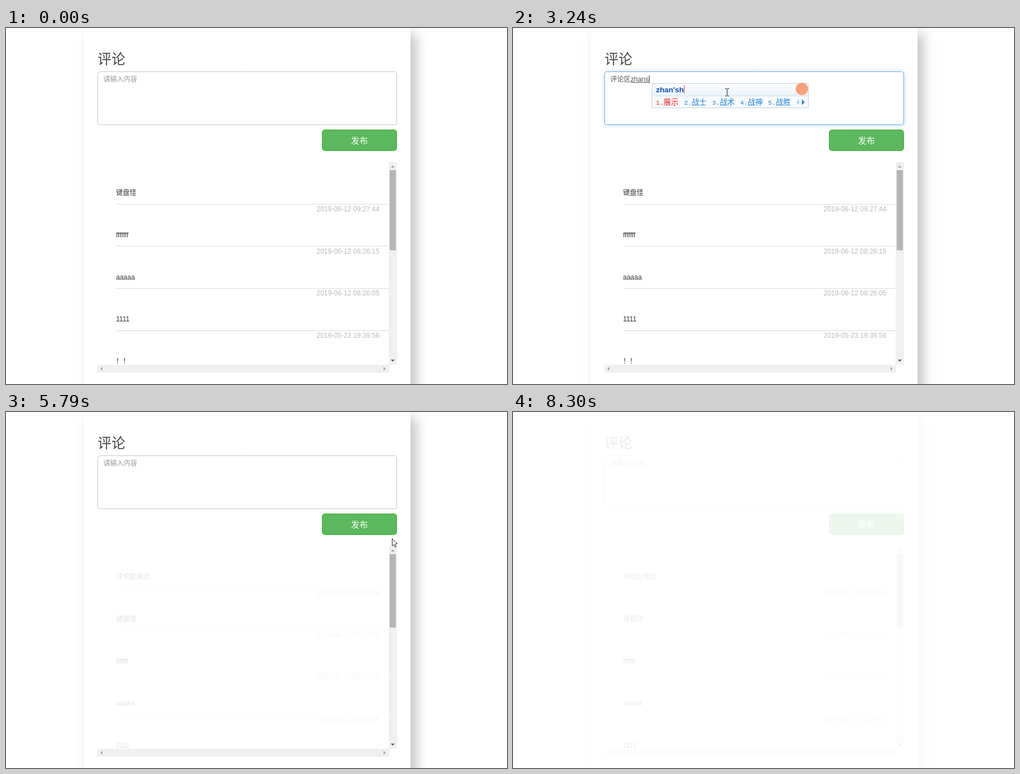
These frames come from a looping animation (888x631 px, 8.37 s). An HTML page with a canvas:

```html
<!DOCTYPE html>
<html lang="zh-CN">
<head>
<meta charset="utf-8">
<style>
html, body { margin: 0; width: 100%; height: 100%; overflow: hidden; background: #fff; }
canvas { display: block; }
</style>
</head>
<body>
<canvas id="stage" width="888" height="631"></canvas>
<script>
const ctx = document.getElementById('stage').getContext('2d');
const LOOP = 8370;
const SANS = '"Liberation Sans", "Noto Sans CJK SC", "Noto Sans CJK", sans-serif';
const MONO = '"Liberation Mono", "Noto Sans CJK SC", "Noto Sans CJK", monospace';
const ROW = 74.67;
const BOX = { x: 162.5, y: 77.5, w: 530, h: 94 };

const oldComments = [
  ['键盘怪', '2019-06-12 09:27:44'],
  ['fffffff', '2019-06-12 08:26:15'],
  ['aaaaa', '2019-06-12 08:26:05'],
  ['1111', '2019-05-23 19:39:56'],
  ['！！', '']
];
const newComments = [['评论区展示', '2019-06-12 09:29:05'], ...oldComments.slice(0, 4)];

// time, committed text, letters being typed, letters in the popup, candidates
const typing = [
  [0, '', '', '', ''],
  [1660, '', 'p', 'p', '怕 平 片 跑 批'],
  [1900, '', 'pl', "p'l", '评论 漂亮 频率 跑路 披露'],
  [2140, '', 'plu', "p'lu", '跑路 披露 平路 铺路 plu'],
  [2220, '', 'plun', "p'lun", '评论 谱论 怕 平 plun'],
  [2450, '', 'plunq', "p'lun'q", '评论区 评论 谱论 平 怕'],
  [2610, '', 'plunqu', "p'lun'qu", '评论区 评论 谱论 平 怕'],
  [2780, '评论区', '', '', ''],
  [2930, '评论区', 'z', 'z', '在 中 这 再 只'],
  [3010, '评论区', 'zh', 'zh', '中 这 只 着 找'],
  [3090, '评论区', 'zha', 'zha', '扎 炸 查 眨 渣'],
  [3160, '评论区', 'zhan', 'zhan', '站 战 占 展 沾'],
  [3240, '评论区', 'zhans', "zhan'sh", '展示 战士 战术 战神 战胜'],
  [3320, '评论区', 'zhansh', "zhan'sh", '展示 战士 战术 战神 战胜'],
  [3400, '评论区', 'zhanshi', "zhan'shi", '展示 战士 战时 暂时 站'],
  [3480, '评论区展示', '', '', ''],
  [5150, '', '', '', '']
];

// time, x, y of the pointer
const path = [
  [70, 765, 600], [790, 379, 114], [3720, 379, 114], [4440, 628, 180],
  [4600, 632, 200], [5070, 632, 200], [5790, 684, 224], [5950, 692, 250],
  [6810, 785, 330], [7430, 892, 400]
];

function text(str, x, y, color, size = 12, family = SANS, weight = '') {
  ctx.font = `${weight} ${size}px ${family}`;
  ctx.fillStyle = color;
  ctx.fillText(str, x, y);
  return ctx.measureText(str).width;
}

function rect(x, y, w, h, color) {
  ctx.fillStyle = color;
  ctx.fillRect(x, y, w, h);
}

function roundRect(x, y, w, h, r, fill, stroke) {
  ctx.beginPath();
  ctx.roundRect(x, y, w, h, r);
  ctx.fillStyle = fill;
  ctx.fill();
  if (!stroke) return;
  ctx.strokeStyle = stroke;
  ctx.lineWidth = 1;
  ctx.stroke();
}

function polygon(points, fill, stroke) {
  ctx.beginPath();
  points.forEach(([x, y]) => ctx.lineTo(x, y));
  ctx.closePath();
  ctx.fillStyle = fill;
  ctx.fill();
  if (stroke) {
    ctx.strokeStyle = stroke;
    ctx.lineWidth = 1;
    ctx.stroke();
  }
}

// small triangle whose tip points along (dx, dy)
function triangle(x, y, dx, dy, size, color) {
  const half = size / 2;
  polygon([
    [x + dx * half, y + dy * half],
    [x - dx * half + dy * size, y - dy * half + dx * size],
    [x - dx * half - dy * size, y - dy * half - dx * size]
  ], color);
}

function withShadow(color, blur, dx, dy, draw) {
  ctx.save();
  ctx.shadowColor = color;
  ctx.shadowBlur = blur;
  ctx.shadowOffsetX = dx;
  ctx.shadowOffsetY = dy;
  draw();
  ctx.restore();
}

function drawPage() {
  rect(0, 0, 888, 631, '#fff');
  withShadow('#c3c3c3', 20, 10, 10, () => rect(138, 0, 579, 700, '#fff'));
  text('评论', 162.5, 64, '#444', 24.5, SANS, 300);
  roundRect(560.5, 180.5, 132, 37, 5, '#5cb85c', '#46a546');
  text('发布', 611.5, 204.5, '#fff', 15);
}

function drawInput(t) {
  const focused = t >= 710 && t < 4200;
  const [, done, letters, pinyin, words] = typing.filter(s => t >= s[0]).pop();
  const { x, y, w, h } = BOX;
  if (focused) {
    withShadow('rgba(102,175,233,.5)', 8, 0, 0, () => roundRect(x, y, w, h, 4, '#fff'));
  }
  roundRect(x, y, w, h, 4, '#fff', focused ? '#66afe9' : '#c4c6c8');

  const left = 172.5, base = 95;
  if (!done && !letters) text('请输入内容', left, base, '#999');
  const start = left + text(done, left, base, '#555');
  const end = start + text(letters, start, base, '#555');
  if (letters) rect(start, 96, end - start, 1, '#555');
  if (focused && !(t >= 1340 && t < 1660)) rect(Math.round(end), 84, 1, 14, '#333');
  return pinyin && { pinyin, words: words.split(' '), x: popupX(start, pinyin) };
}

function popupX(start, pinyin) {
  ctx.font = '12px ' + SANS;
  return Math.round(start + ctx.measureText(pinyin.replace(/'/g, '')).width - .9);
}

function drawPopup({ pinyin, words, x }) {
  const isLatin = word => /[a-z]/.test(word);
  const widthOf = word => word.length * (isLatin(word) ? 6.67 : 13.33);
  const total = words.reduce((sum, word) => sum + 13.33 + widthOf(word) + 9.7, 0);
  const width = Math.round(total + 30);
  const right = x + width;

  const shade = ctx.createLinearGradient(0, 98, 0, 121);
  shade.addColorStop(0, '#fff');
  shade.addColorStop(1, '#e9f3fb');
  rect(x, 98, width, 44, '#f7fbfe');
  rect(x, 98, width, 23, shade);
  rect(x, 120, width, 1, '#d3dfe8');
  ctx.strokeStyle = '#c6d0d8';
  ctx.lineWidth = 1;
  ctx.strokeRect(x + .5, 98.5, width - 1, 43);

  const typedWidth = text(pinyin, x + 7.5, 113.5, '#0d4fae', 13.33, SANS, 'bold');
  rect(Math.round(x + 8 + typedWidth), 102, 1, 14, '#b8405a');

  ctx.beginPath();
  ctx.arc(right - 12, 108, 11, 0, Math.PI * 2);
  ctx.fillStyle = '#fa9f78';
  ctx.fill();

  let cx = x + 7.5;
  words.forEach((word, i) => {
    const color = i ? '#1a80d9' : '#ee2222';
    text(`${i + 1}.`, cx, 136, color, 11.1, MONO);
    text(word, cx + 13.33, 136, color, isLatin(word) ? 11.1 : 13.33, MONO);
    cx += 13.33 + widthOf(word) + 9.7;
  });
  triangle(right - 19.5, 131.5, -1, 0, 5, '#a9d3f3');
  triangle(right - 9.5, 131.5, 1, 0, 5, '#1a80d9');
}

function drawList(t) {
  const posted = t >= 5150;
  const step = Math.floor((t - 5150) / 80) * 80 + 5150;
  const p = Math.min(1, Math.max(0, (step - 5300) / 2000));
  const alpha = posted ? .5 - Math.cos(p * Math.PI) / 2 : 1;

  ctx.save();
  ctx.beginPath();
  ctx.rect(162, 238, 517, 359);
  ctx.clip();
  ctx.globalAlpha = alpha;
  (posted ? newComments : oldComments).forEach(([body, date], i) => {
    const y = i * ROW;
    text(body, 195, Math.round(296.3 + y), '#333');
    rect(195, Math.round(311.8 + y), 484, 1, '#dcdadc');
    text(date, 550.5, Math.round(325 + y), '#bbb');
  });
  ctx.restore();

  rect(678.5, 238, 14.5, 359, '#f0f0f0');
  rect(680, 252, 11, posted ? 130 : 142, '#b5b5b5');
  rect(162, 597, 517, 14, '#f0f0f0');
  triangle(685.5, 245.5, 0, -1, 3.5, '#a3a3a3');
  triangle(685.5, 589.5, 0, 1, 3.5, '#505050');
  triangle(169, 604, -1, 0, 3.5, '#a3a3a3');
  triangle(671, 604, 1, 0, 3.5, '#a3a3a3');
}

function pointerAt(t) {
  const i = path.findIndex(([time]) => time > t);
  if (i < 1) return null;
  const [t0, x0, y0] = path[i - 1];
  const [t1, x1, y1] = path[i];
  const p = Math.floor((t - t0) / 80) * 80 / (t1 - t0);
  return [Math.round(x0 + (x1 - x0) * p), Math.round(y0 + (y1 - y0) * p)];
}

function drawPointer(t) {
  const point = pointerAt(t);
  if (!point) return;
  const [x, y] = point;
  if (x > BOX.x && x < BOX.x + BOX.w && y > BOX.y && y < BOX.y + BOX.h) {
    rect(x, y - 6, 1, 12, '#222');
    [-7, 6].forEach(dy => {
      rect(x - 3, y + dy, 3, 1, '#222');
      rect(x + 1, y + dy, 3, 1, '#222');
    });
    return;
  }
  const outline = [[0, 0], [0, 13], [3, 10.5], [5, 15], [7, 14], [5, 9.5], [9, 9]];
  polygon(outline.map(([dx, dy]) => [x + dx + .5, y + dy + .5]), '#fff', '#222');
}

function render(t) {
  drawPage();
  const popup = drawInput(t);
  drawList(t);
  if (popup) drawPopup(popup);
  drawPointer(t);
  if (t >= 7670) {
    const step = Math.min(10, Math.floor((t - 7670) / 70) + 1);
    rect(0, 0, 888, 631, `rgba(255,255,255,${step / 11.2})`);
  }
}

const begin = performance.now();
function tick() {
  render((performance.now() - begin) % LOOP);
  requestAnimationFrame(tick);
}
tick();
</script>
</body>
</html>
```
